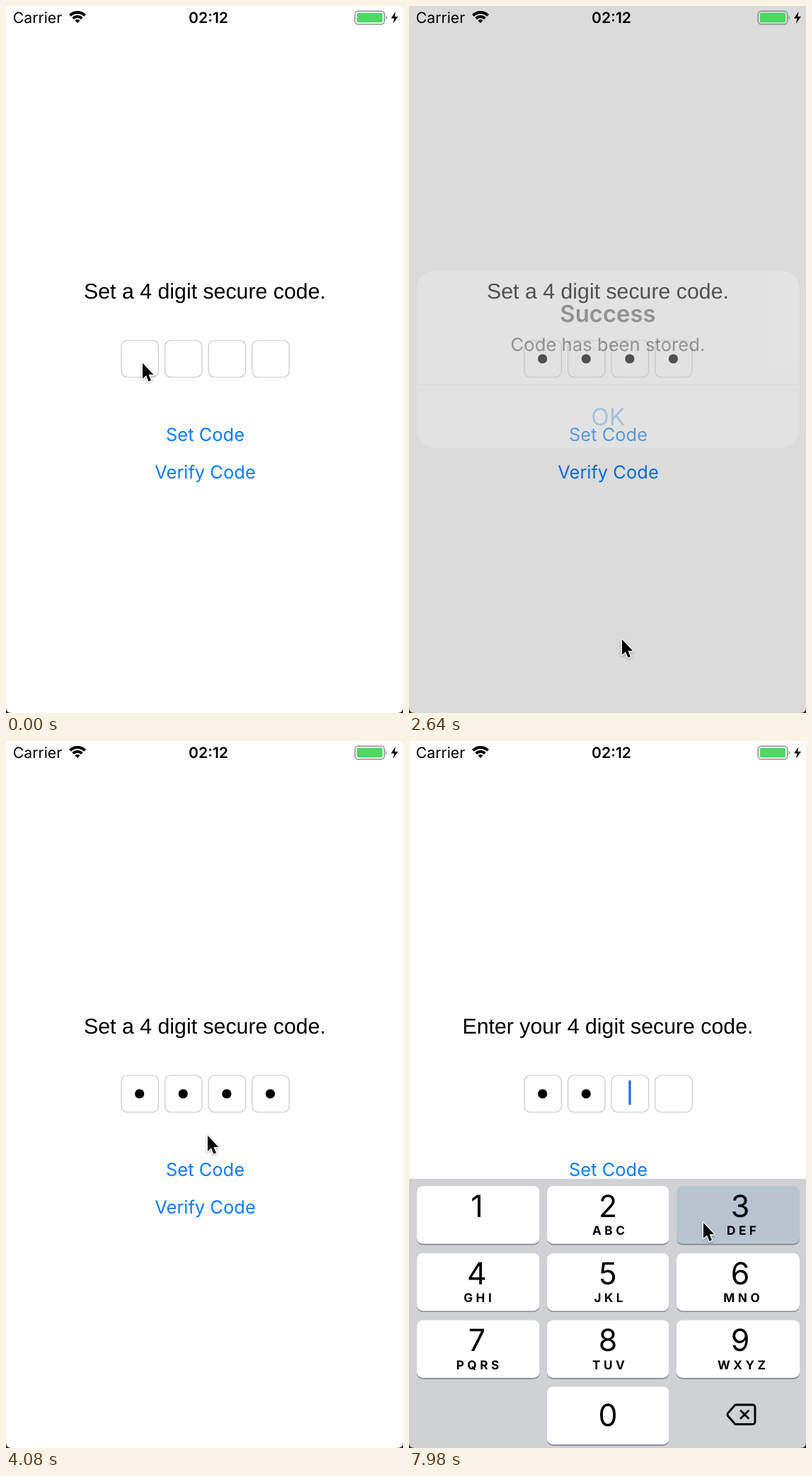
These frames come from a looping animation (561x998 px, 8000 ms). An HTML page:

```html
<!DOCTYPE html>
<html lang="en">
<head>
<meta charset="utf-8">
<title>Secure code entry</title>
<style>
  html, body { margin: 0; width: 100%; height: 100%; overflow: hidden; background: #fff; }
  svg { display: block; width: 100%; height: 100%; }
  text { font-family: Inter, sans-serif; text-anchor: middle; text-rendering: geometricPrecision; }
  .prompt { font: 30.3px "Liberation Sans", Arial, sans-serif; }
  .link { font-size: 25.5px; }
  .digit { font-size: 43px; }
  .letters { font-size: 17.2px; font-weight: 700; letter-spacing: 4.5px; }
  .status { font-size: 21.2px; }
</style>
</head>
<body>
<svg viewBox="0 0 561 998">
  <rect width="561" height="998" fill="#fff"/>
  <text id="prompt" class="prompt" x="281" y="412.5"></text>
  <g id="fields"></g>
  <rect id="caret" y="479" width="3.4" height="34.5" rx="1.2" fill="#2a74dd"/>
  <g id="links" class="link">
    <text x="281.5" y="613.5">Set Code</text>
    <text x="281.5" y="666.5">Verify Code</text>
  </g>
  <g id="keyboard">
    <rect y="618" width="561" height="382" fill="#cfd1d5"/>
    <g id="keys"></g>
    <g fill="none" stroke="#000" stroke-width="2.9" stroke-linejoin="round" stroke-linecap="round">
      <path d="M461 937H485Q489 937 489 941V960.500Q489 964.500 485 964.500H461L450.500 952.500Q449.500 950.800 450.500 949Z"/>
      <path d="M469 945.500L479.500 956M479.500 945.500L469 956"/>
    </g>
  </g>
  <rect id="dim" width="561" height="998" fill="#000002"/>
  <g id="alert">
    <rect x="44" y="389" width="474.500" height="219" rx="23" fill="#f3f3f3"/>
    <path d="M44 530H518.500" stroke="#d6d6d9" stroke-width="1.300"/>
    <text x="281" y="452.500" font-size="28.800" font-weight="600">Success</text>
    <text x="281" y="488" font-size="22.500">Code has been stored.</text>
    <text x="281.500" y="580.500" font-size="29.500" fill="#3f8bdc">OK</text>
  </g>
  <g id="status" class="status">
    <text x="44.500" y="24">Carrier</text>
    <text x="286" y="24" font-weight="600">02:12</text>
    <g id="wifi" fill="none" stroke="#000"></g>
    <rect x="493.200" y="7.200" width="41.500" height="18.600" rx="4.500" fill="none" stroke="#8e8e90" stroke-width="1.500"/>
    <rect x="496" y="9.800" width="36" height="13.500" rx="2" fill="#4cd964"/>
    <path d="M536.600 13Q539.500 16.500 536.600 20Z" fill="#8e8e90"/>
    <path d="M550.500 8L544 17.600H548.600L546.800 25L554 15H549.300Z"/>
  </g>
  <path d="M0 990Q0 998 8 998H0ZM561 990Q561 998 553 998H561Z" fill="#222"/>
  <g id="pointer">
    <path d="M1 2V24L6 19.400L9.500 28L13 26.500L9.500 18.200H16.300Z" stroke="#fff" stroke-width="3"
      stroke-linejoin="round" paint-order="stroke" style="filter:drop-shadow(0 1.500px 1.500px #0005)"/>
  </g>
</svg>
<script>
const LOOP = 8000, STEP = 60;
const $ = id => document.getElementById(id);
const fieldX = i => 163 + i * 61.6;

$('fields').innerHTML = [0, 1, 2, 3].map(i => `
  <rect x="${fieldX(i)}" y="472" width="52.4" height="52" rx="8.5" fill="none" stroke="#c9c9cb" stroke-width="1.2"/>
  <circle cx="${fieldX(i) + 25.7}" cy="498" r="6.6"/>`).join('');
const dots = $('fields').querySelectorAll('circle');

$('wifi').innerHTML = [[2.5, 5], [9, 3.8], [15, 4]].map(([r, width]) => {
  const s = r * Math.SQRT1_2;
  return `<path d="M${101 - s} ${24 - s}A${r} ${r} 0 0 1 ${101 + s} ${24 - s}" stroke-width="${width}"/>`;
}).join('');

const letters = ['', 'ABC', 'DEF', 'GHI', 'JKL', 'MNO', 'PQRS', 'TUV', 'WXYZ'];
const columns = [
  { x: 11, w: 173.5, digit: 96, text: 97 },
  { x: 195, w: 172.5, digit: 281, text: 282 },
  { x: 378, w: 174, digit: 468, text: 470 }
];
function key(digit, col, y, label, baseline) {
  const c = columns[col];
  return `<rect x="${c.x}" y="${y + 1.7}" width="${c.w}" height="81.5" rx="8.5" fill="#87898d"/>
    <rect id="key${digit}" x="${c.x}" y="${y}" width="${c.w}" height="81.5" rx="8.5"/>
    <text class="digit" x="${c.digit}" y="${y + baseline}">${digit}</text>
    <text class="letters" x="${c.text + 2.25}" y="${y + 69}">${label}</text>`;
}
$('keys').innerHTML = letters.map((label, i) =>
  key(i + 1, i % 3, 628.3 + Math.floor(i / 3) * 94.6, label, 43.8)).join('') + key(0, 1, 911.5, '', 55.2);

// Each press: key, time down, time up; a dot is entered on release.
const presses = [
  [0, 1260, 1380], [0, 1620, 1740], [0, 2100, 2220], [0, 2460, 2520],
  [1, 6960, 7080], [2, 7560, 7680], [3, 7980, 8100]
];
const CLEARED = 4140;
const sessions = [
  { from: 240, to: 2520, blink: 300 },
  { from: 5280, to: LOOP, blink: 5220 }
];
// time, x, y of the pointer tip
const route = [
  [0, 192, 502], [480, 192, 502], [600, 207, 570], [900, 285, 915], [1020, 297, 960],
  [2520, 297, 960], [2640, 300, 892], [2880, 303, 835], [3060, 302, 720], [3120, 302, 655],
  [3180, 295, 590], [3240, 284, 555], [4620, 284, 555], [4860, 225, 517], [5040, 192, 499],
  [6060, 192, 499], [6240, 171, 565], [6480, 120, 635], [6840, 82, 668],
  [7140, 82, 668], [7500, 262, 680], [7740, 262, 680], [7980, 415, 678], [LOOP, 415, 678]
];

const clamp = v => Math.min(1, Math.max(0, v));
const ramp = (t, from, length) => clamp((t - from) / length);
const easeOut = p => 1 - (1 - p) ** 3;
const mix = (a, b, p) => a + (b - a) * p;

function pointerAt(t) {
  const i = route.findIndex(point => point[0] > t);
  const [a, b] = [route[i - 1], route[i]];
  const p = ramp(t, a[0], b[0] - a[0]);
  return [mix(a[1], b[1], p), mix(a[2], b[2], p)];
}

function caretOpacity(age) {
  const phase = age % 960;
  return Math.max(1 - ramp(phase, 480, 120), ramp(phase, 840, 120));
}

function draw(t) {
  const verifying = t >= CLEARED;
  $('prompt').textContent = verifying ? 'Enter your 4 digit secure code.' : 'Set a 4 digit secure code.';

  const entered = presses.filter(([, , up]) => up <= t && (up > CLEARED) === verifying);
  dots.forEach((dot, i) => dot.setAttribute('opacity', i < entered.length ? 1 : 0));

  const session = sessions.find(s => t >= s.from && t < s.to);
  const blinkStart = entered.length ? entered[entered.length - 1][2] : session?.blink;
  $('caret').setAttribute('x', fieldX(entered.length) + 24.1);
  $('caret').setAttribute('opacity', session ? caretOpacity(Math.max(0, t - blinkStart)) : 0);

  const shown = t < 2520 ? easeOut(ramp(t, 240, 480))
    : t < 5280 ? 1 - ramp(t, 2520, 120)
    : easeOut(ramp(t, 5280, 480));
  $('keyboard').setAttribute('transform', `translate(0 ${mix(382, 0, shown)})`);
  for (let k = 0; k < 10; k++) {
    const down = presses.some(([id, from, to]) => id === k && t >= from && t < to);
    $('key' + k).setAttribute('fill', down ? '#b8c4d0' : '#fff');
  }

  const appear = easeOut(ramp(t, 2580, 480));
  const visible = appear * (1 - easeOut(ramp(t, 3360, 420)));
  const scale = mix(1.21, 1, appear);
  $('dim').setAttribute('opacity', 0.43 * visible);
  $('alert').setAttribute('opacity', visible);
  $('alert').setAttribute('transform', `translate(281.2 498.5) scale(${scale}) translate(-281.2 -498.5)`);
  const gray = clamp((visible - 0.3) / 0.7);
  $('links').setAttribute('fill', `rgb(${mix(10, 142, gray)},${mix(124, 142, gray)},${mix(245, 142, gray)})`);

  $('pointer').setAttribute('transform', `translate(${pointerAt(t)})`);
}

function tick(now) {
  draw(Math.floor((now % LOOP) / STEP) * STEP);
  requestAnimationFrame(tick);
}
tick(0);
</script>
</body>
</html>
```
